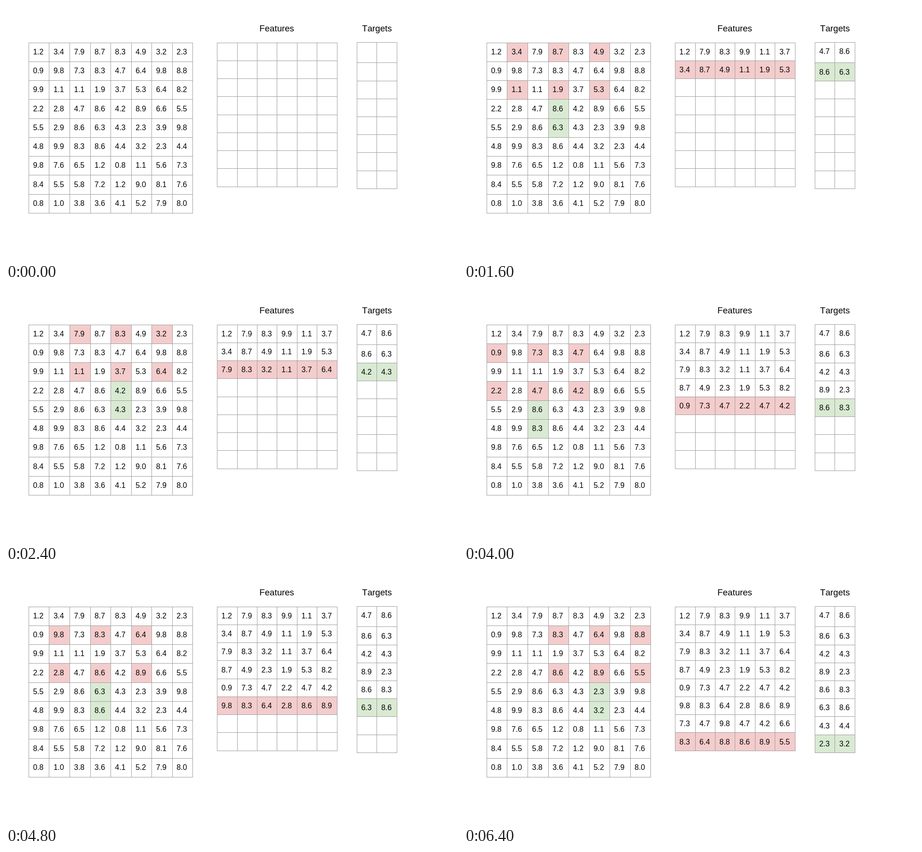
Write an HTML page with a canvas that moves like this. It is 960 px wide and 540 px high and loops after 7.2 s.

```html
<!DOCTYPE html>
<html lang="en">
<head>
<meta charset="utf-8">
<title>Sliding window features and targets</title>
<style>
  html, body { margin: 0; width: 100%; height: 100%; overflow: hidden; background: #fff; }
  canvas { display: block; }
</style>
</head>
<body>
<canvas id="stage" width="960" height="540"></canvas>
<script>
const ctx = document.getElementById('stage').getContext('2d');
const STEP_MS = 800, WINDOWS = 8, PER_ROW = 4;
const RED = '#f4cccc', GREEN = '#d9ead3', LINE = '#9e9e9e';
const FONT = '"Liberation Sans", Arial, sans-serif';
const PAD_X = 9.5, BASELINE = 25.15;

// The matrix text; the other two tables are derived from it.
const matrixText = `1.2 3.4 7.9 8.7 8.3 4.9 3.2 2.3
0.9 9.8 7.3 8.3 4.7 6.4 9.8 8.8
9.9 1.1 1.1 1.9 3.7 5.3 6.4 8.2
2.2 2.8 4.7 8.6 4.2 8.9 6.6 5.5
5.5 2.9 8.6 6.3 4.3 2.3 3.9 9.8
4.8 9.9 8.3 8.6 4.4 3.2 2.3 4.4
9.8 7.6 6.5 1.2 0.8 1.1 5.6 7.3
8.4 5.5 5.8 7.2 1.2 9.0 8.1 7.6
0.8 1.0 3.8 3.6 4.1 5.2 7.9 8.0`;
const values = matrixText.split('\n').map(row => row.split(' '));

function makeGrid(cols, rows, xAt, yAt) {
  return {
    cols, rows, xAt, yAt,
    x: c => Math.round(xAt(c)),
    y: r => Math.round(yAt(r))
  };
}
const matrix = makeGrid(8, 9, c => 47.9 + 43.55 * c, r => 77.7 + 40.25 * r);
const features = makeGrid(6, 8, c => 448.1 + 42.46 * c, r => 77.7 + 38.25 * r);
// The first target row is taller than the rest.
const targets = makeGrid(2, 8, c => 744.9 + 42.5 * c, r => r ? 82.25 + 38.2 * r : 77);

// Cells of the i-th window, as [row, column] pairs.
function windowCells(i) {
  const top = Math.floor(i / PER_ROW), left = i % PER_ROW;
  return {
    inputs: [0, 2].flatMap(r => [0, 2, 4].map(c => [top + r, left + c])),
    outputs: [3, 4].map(r => [top + r, left + 2])
  };
}

function fillCell(g, r, c, color) {
  ctx.fillStyle = color;
  ctx.fillRect(g.x(c), g.y(r), g.x(c + 1) - g.x(c), g.y(r + 1) - g.y(r));
}

function drawLines(g) {
  const x = g.x(0), y = g.y(0);
  ctx.fillStyle = LINE;
  for (let c = 0; c <= g.cols; c++) ctx.fillRect(g.x(c), y, 1, g.y(g.rows) - y + 1);
  for (let r = 0; r <= g.rows; r++) ctx.fillRect(x, g.y(r), g.x(g.cols) - x + 1, 1);
}

function drawText(text, x, y, size) {
  ctx.fillStyle = '#000';
  ctx.font = `${size}px ${FONT}`;
  ctx.fontKerning = 'none';
  ctx.fillText(text, x, y);
}

function drawValue(g, r, c, text) {
  drawText(text, g.xAt(c) + PAD_X, Math.round(g.yAt(r) + BASELINE), 16);
}

function drawRow(g, r, cells, color) {
  cells.forEach(([row, col], c) => {
    if (color) fillCell(g, r, c, color);
    drawValue(g, r, c, values[row][col]);
  });
}

function draw(step) {
  ctx.fillStyle = '#fff';
  ctx.fillRect(0, 0, 960, 540);
  drawText('Features', 538.3, 54, 18.67);
  drawText('Targets', 756.3, 54, 18.67);

  if (step > 0) {
    const { inputs, outputs } = windowCells(step - 1);
    inputs.forEach(([r, c]) => fillCell(matrix, r, c, RED));
    outputs.forEach(([r, c]) => fillCell(matrix, r, c, GREEN));
  }
  values.forEach((row, r) => row.forEach((v, c) => drawValue(matrix, r, c, v)));

  for (let i = 0; i < step; i++) {
    const { inputs, outputs } = windowCells(i);
    const current = i === step - 1;
    drawRow(features, i, inputs, current && RED);
    drawRow(targets, i, outputs, current && GREEN);
  }
  [matrix, features, targets].forEach(drawLines);
}

const start = performance.now();
function tick() {
  const elapsed = Math.max(0, performance.now() - start);
  draw(Math.floor(elapsed / STEP_MS) % (WINDOWS + 1));
  requestAnimationFrame(tick);
}
tick();
</script>
</body>
</html>
```
